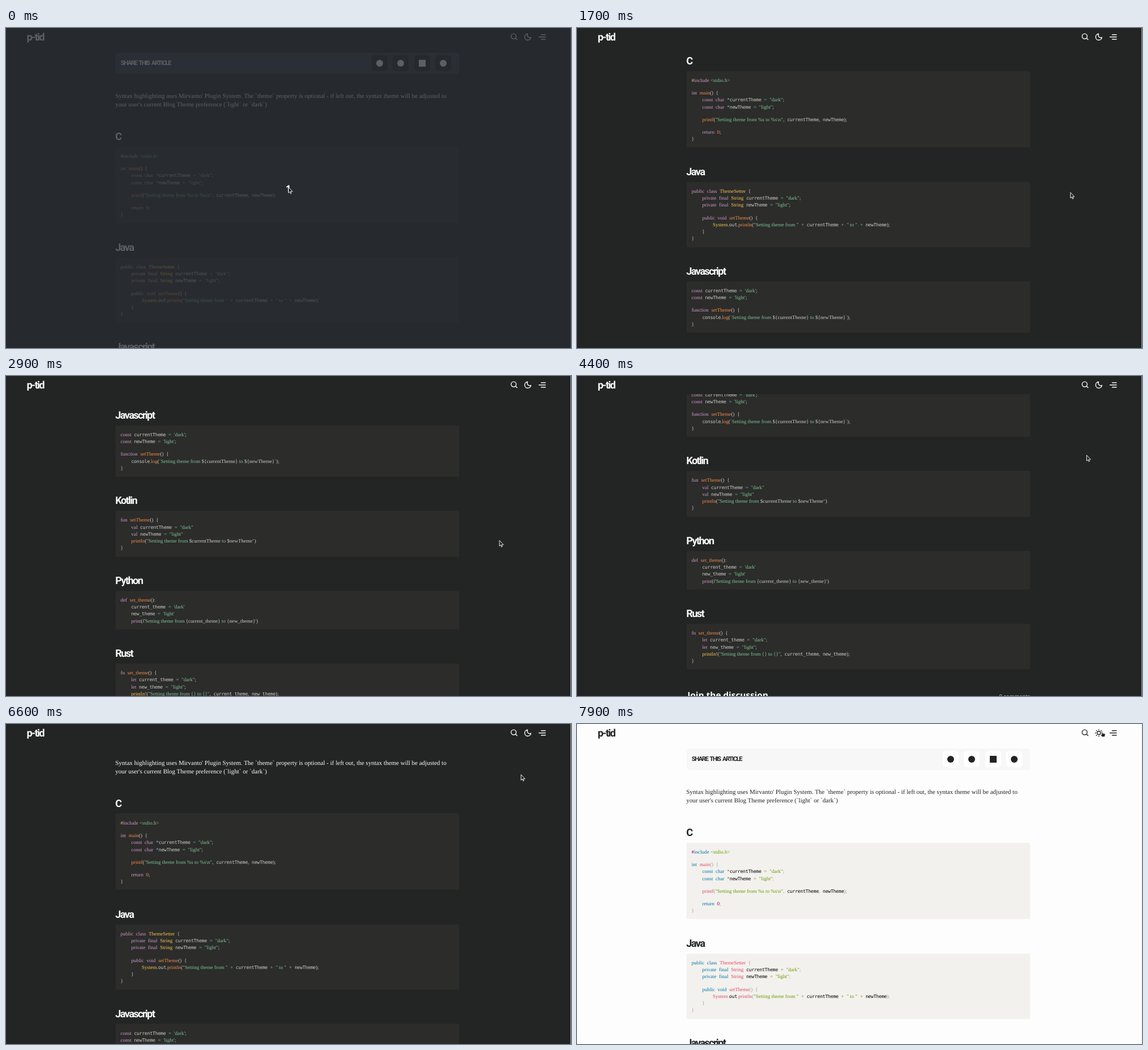
An HTML page for the animation above (8000 ms loop, 995 by 563 pixels).

```html
<!DOCTYPE html>
<html lang="en">
<head>
<meta charset="utf-8">
<title>Blog theme demo</title>
<style>
  body {
    --bg: #232524; --ink: #fafafa; --share: #343b46; --button: #232524; --edge: #a0a1a1;
    --code: #2c2c2a; --id: #ccc; --str: #7ec699; --key: #cc99cd; --macro: #f8c555; --type: #f8c555;
    --num: #f08d49; --fn: #f08d49; --op: #67cdcc; --punct: #ccc;
  }
  body.light {
    --bg: #fdfdfd; --ink: #222424; --share: #f7f7f7; --button: #fff; --edge: #eee;
    --code: #f3f1ed; --id: #000; --str: #690; --key: #07a; --macro: #905; --type: #dd4a68;
    --num: #905; --fn: #dd4a68; --op: #9a6e3a; --punct: #999;
  }
  html, body { margin: 0; width: 100%; height: 100%; overflow: hidden; }
  body { position: relative; background: var(--bg); color: var(--ink); text-rendering: geometricPrecision; }
  header, main, .share, .intro, .sections, .comments, svg, .veil, .edge { position: absolute; }
  main { left: 192.5px; top: 0; width: 605.5px; }
  header { left: 0; top: 0; width: 100%; height: 32px; background: var(--bg); }
  h1, h2 { margin: 0; font: bold 18px/20px Roboto, sans-serif; letter-spacing: -1.55px; white-space: nowrap; }
  h1 { position: absolute; left: 36.5px; top: 7px; }
  h2 { height: 27px; padding-top: 33.5px; }
  .share { top: 43px; width: 100%; height: 37.5px; border-radius: 5px; background: var(--share);
    font: bold 11px/38px Roboto, sans-serif; letter-spacing: -1.35px; word-spacing: 2px; text-indent: 9.5px; }
  .share i { position: absolute; top: 5px; width: 28px; height: 28px; border-radius: 5px; background: var(--button); }
  .share i::after { content: ""; position: absolute; inset: 8px; border-radius: 50%; background: var(--ink); }
  .share i.square::after { border-radius: 0; }
  .intro { top: 112.5px; margin: 0; font: 11px/15.4px "Liberation Serif", serif; white-space: nowrap; }
  .sections { top: 148.6px; width: 100%; }
  pre { margin: 0; padding: 9.8px 9.3px 8.8px; border-radius: 2px; background: var(--code); color: var(--id);
    font: 8.2px/12.3px "DejaVu Sans Mono", monospace; letter-spacing: -.27px; }
  pre div { height: 12.3px; }
  pre div:empty { height: 9.9px; }
  pre span { font-family: "Liberation Serif", serif; font-size: 9px; letter-spacing: 0; }
  .str { color: var(--str); } .key { color: var(--key); } .macro { color: var(--macro); }
  .type { color: var(--type); } .num { color: var(--num); } .fn { color: var(--fn); }
  .op { color: var(--op); } .punct { color: var(--punct); } .slot { color: var(--id); }
  .comments { top: 1114px; left: 2px; right: 0; display: flex; justify-content: space-between;
    font: bold 15.3px/20px "Noto Sans", sans-serif; }
  .comments small { font: 9.4px/24px "Noto Sans", sans-serif; opacity: .7; }
  .edge { right: 0; top: 0; width: 1px; height: 100%; background: var(--edge); }
  .veil { inset: 0; background: rgba(39, 43, 48, .75); }
  .veil b { position: absolute; left: 0; top: 271px; width: 994px; text-align: center; color: #fff;
    font: bold 16px/22px "Noto Sans", sans-serif; }
  svg { left: 0; top: 0; width: 995px; height: 563px; fill: none; stroke-linecap: round; stroke-linejoin: round; }
  .icons { stroke: var(--ink); stroke-width: 1.4; }
  .sun, .light .moon { display: none; }
  .light .sun { display: inline; }
  #cursor { fill: #222; stroke: #fff; stroke-width: .9; }
</style>
</head>
<body>
<main id="page">
  <div class="share">SHARE THIS ARTICLE
    <i style="left:451px"></i><i style="left:488.5px"></i><i class="square" style="left:526px"></i><i style="left:563.5px"></i>
  </div>
  <p class="intro">Syntax highlighting uses Mirvanto' Plugin System. The `theme` property is optional - if left out, the syntax theme will be adjusted to<br>your user's current Blog Theme preference (`light` or `dark`)</p>
  <div class="sections">
<h2>C</h2>
<pre>
#include &lt;stdio.h>

int main() {
    const char *currentTheme = "dark";
    const char *newTheme = "light";

    printf("Setting theme from %s to %s\n", currentTheme, newTheme);

    return 0;
}
</pre>
<h2>Java</h2>
<pre>
public class ThemeSetter {
    private final String currentTheme = "dark";
    private final String newTheme = "light";

    public void setTheme() {
        System.out.println("Setting theme from " + currentTheme + " to " + newTheme);
    }
}
</pre>
<h2>Javascript</h2>
<pre>
const currentTheme = 'dark';
const newTheme = 'light';

function setTheme() {
    console.log(`Setting theme from ${currentTheme} to ${newTheme}`);
}
</pre>
<h2>Kotlin</h2>
<pre>
fun setTheme() {
    val currentTheme = "dark"
    val newTheme = "light"
    println("Setting theme from $currentTheme to $newTheme")
}
</pre>
<h2>Python</h2>
<pre>
def set_theme():
    current_theme = 'dark'
    new_theme = 'light'
    print(f'Setting theme from {current_theme} to {new_theme}')
</pre>
<h2>Rust</h2>
<pre>
fn set_theme() {
    let current_theme = "dark";
    let new_theme = "light";
    println!("Setting theme from {} to {}", current_theme, new_theme);
}
</pre>
  </div>
  <div class="comments">Join the discussion <small>0 comments</small></div>
</main>
<header><h1>p-tid</h1></header>
<svg class="icons">
  <circle cx="894" cy="14.6" r="4.5"/>
  <path d="M897.4 18 900 20.6M942.5 11.8H950M938.5 15.8H950M942.5 19.8H950"/>
  <path class="moon" d="M918.6 10.2A5.5 5.5 0 1 0 924.4 16.4A4.4 4.4 0 0 1 918.6 10.2Z"/>
  <g class="sun">
    <circle cx="919" cy="15.8" r="3"/>
    <path d="M919 9.6v.8M919 21.2v.8M912.8 15.8h.8M924.4 15.8h.8M914.6 11.4l.6.6M922.8 19.6l.6.6M914.6 20.2l.6-.6M922.8 12l.6-.6"/>
  </g>
</svg>
<div class="edge"></div>
<div class="veil" id="veil"><b>1</b></div>
<svg><path id="cursor"/></svg>
<script>
const kinds = ['str', 'key', 'macro', 'type', 'num', 'fn', 'op', 'punct'];
const tokens = new RegExp([
  /(f?"[^"]*"|f?'[^']*'|`[^`]*`| ?<.*>)/,
  /\b(include|int|const|char|return|public|class|private|final|void|function|fun|val|def|print|fn|let)\b/,
  /(#|\w+!)/, /\b([A-Z]\w*)/, /\b(\d)/, /(\w+(?=\())/, /([=+*])/, /([(){};.,:])/
].map(r => r.source).join('|'), 'g');

const highlight = line => line.replace(tokens, (text, ...groups) => {
  const kind = kinds[groups.findIndex(Boolean)];
  let body = text.replace('<', '&lt;');
  if (kind === 'str') body = body.replace(/\$?\{\w+\}|\$\w+/g, '<span class="slot">$&</span>');
  return `<span class="${kind}">${body}</span>`;
});

for (const pre of document.querySelectorAll('pre')) {
  pre.innerHTML = pre.textContent.trimEnd().split('\n').map(l => `<div>${highlight(l)}</div>`).join('');
}

// Keys are [time, ...values], joined linearly.
const TICK = 70.24;
const scrollKeys = [
  [1300, 0], [1400, 18], [1700, 133], [1800, 178], [1900, 3 * TICK],
  [2000, 3 * TICK], [2100, 229], [2800, 476], [2900, 7 * TICK],
  [3300, 7 * TICK], [3400, 510.4], [3500, 543.5], [3600, 8 * TICK],
  [5000, 8 * TICK], [5100, 543], [5500, 424], [6300, 86], [6400, TICK],
  [6500, TICK], [6600, 51.5], [6700, 18.5], [6800, 0]
];
const cursorKeys = [
  [400, 497.5, 280.5], [600, 545, 283], [1000, 822, 291], [1200, 869, 289.7],
  [4000, 869, 289.7], [4100, 873, 272], [4400, 897.5, 139.7], [4700, 910, 52], [4900, 913, 30.5],
  [5000, 913, 30.5], [5500, 912.5, 49.7], [5900, 907, 89.3],
  [6900, 907, 89.3], [7200, 920, 55], [7400, 932, 22], [7600, 921.5, 12]
];
function sample(keys, t) {
  const next = keys.findIndex(k => k[0] > t);
  if (next < 0) return keys.at(-1).slice(1);
  if (next === 0) return keys[0].slice(1);
  const [a, b] = [keys[next - 1], keys[next]];
  const f = (t - a[0]) / (b[0] - a[0]);
  return a.slice(1).map((v, i) => v + (b[i + 1] - v) * f);
}

const ARROW = 'M0 0V9.6L2.2 7.6 3.8 11 5.2 10.3 3.7 7.2H6.7Z';
const HAND = 'M2.2.8Q3 0 3.8.8V4L8 5Q9 5.3 8.8 6.5L8 10.7H3.2L.4 6.9Q.2 5.9 1.2 6L2.2 6.8Z';

function draw() {
  const t = Math.floor(performance.now() % 8000 / 100) * 100;
  const [x, y] = sample(cursorKeys, t);
  document.body.classList.toggle('light', t >= 7900);
  veil.style.display = t < 100 ? '' : 'none';
  page.style.transform = `translateY(${-sample(scrollKeys, t)[0]}px)`;
  cursor.setAttribute('d', t >= 7500 ? HAND : ARROW);
  cursor.setAttribute('transform', `translate(${x} ${y})`);
  requestAnimationFrame(draw);
}
draw();
</script>
</body>
</html>
```
